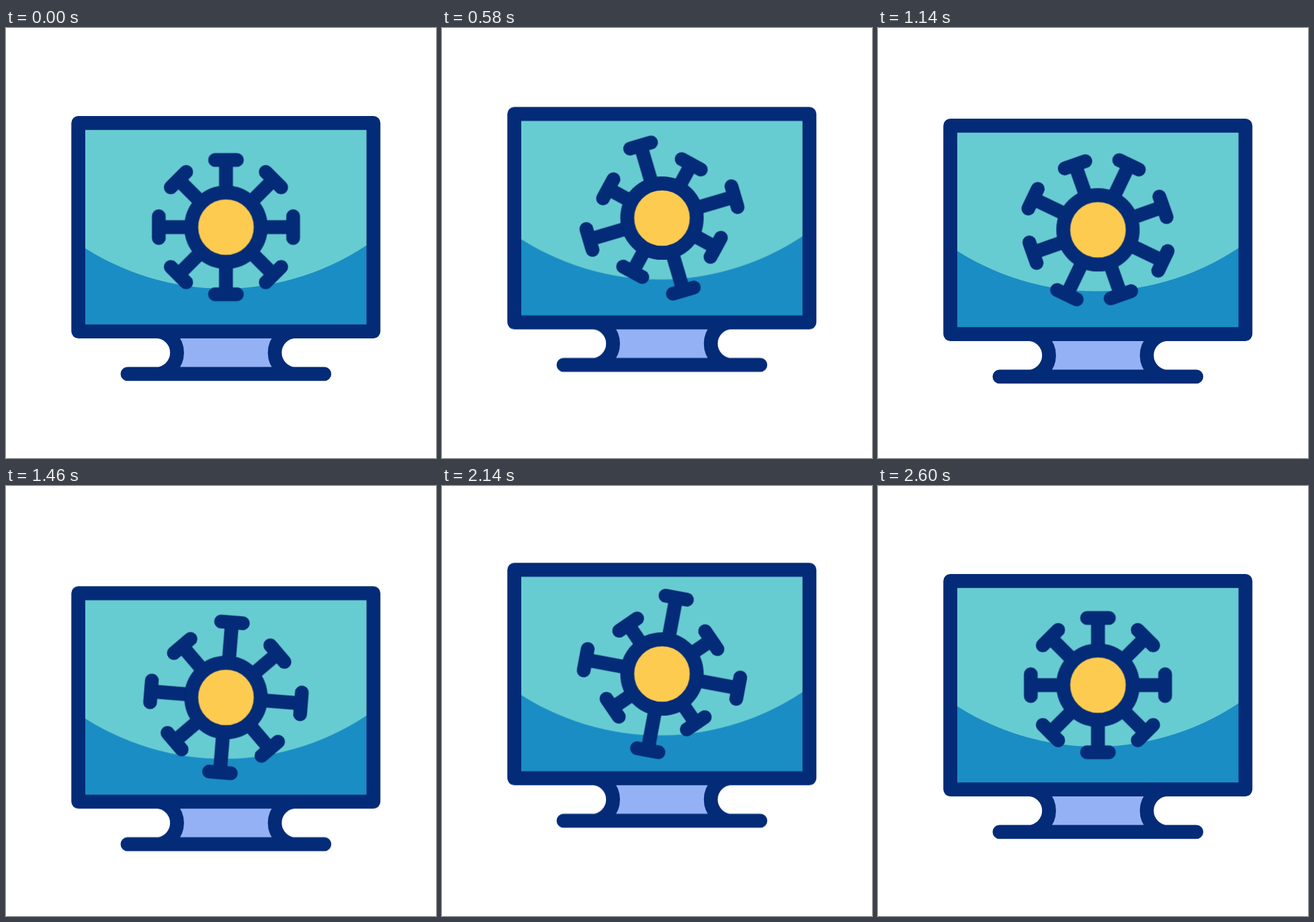
Animation of 640 by 640 pixels, one loop 2820 ms. Source, as an HTML page:

```html
<!DOCTYPE html>
<html lang="en">
<head>
<meta charset="utf-8">
<title>Virus on a monitor</title>
<style>
  html, body { margin: 0; width: 100%; height: 100%; overflow: hidden; background: #fff; }
  svg { display: block; width: 100vw; height: 100vh; }
  .line { fill: none; stroke: #042b77; stroke-width: 20.7; stroke-linecap: round; stroke-linejoin: round; }
</style>
</head>
<body>
<svg viewBox="0 0 640 640">
  <g id="monitor">
    <path fill="#95b1f5" d="M222.8 451.5A31.8 31.8 0 0 1 222.8 515H431.8A31.8 31.8 0 0 1 431.8 451.5Z"/>
    <path class="line" d="M222.8 451.5a31.75 31.75 0 0 1 0 63.5M431.8 451.5a31.75 31.75 0 0 0 0 63.5M180.9 514.9H473.8"/>
    <path fill="#67ccd1" d="M107.6 141.4H546.9V451.6H107.6Z"/>
    <path fill="#1a8dc4" d="M107.6 320.9A383 383 0 0 0 546.9 316.2V451.6H107.6Z"/>
    <path class="line" d="M107.6 141.4H546.9V451.6H107.6Z"/>
    <g transform="translate(327.4 296.4)">
      <g id="virus"></g>
      <circle class="line" r="51.7" style="fill:#fdcb50"/>
    </g>
  </g>
</svg>
<script>
  const LOOP = 2820;
  const STOPS = [0, 200, 800, 1400, 2000, 2600, LOOP];
  const EASE = 'cubic-bezier(0.3333, 0, 0.6667, 1)';
  const BOB = 19.35;
  const REACH = 12.75;
  const DIAGONAL = REACH * Math.SQRT2;

  const monitor = document.getElementById('monitor');
  const virus = document.getElementById('virus');

  function play(el, frames) {
    el.animate(frames, { duration: LOOP, iterations: Infinity }).startTime = 0;
  }

  // Vertical offsets at 800, 1400 and 2000 ms, at rest elsewhere.
  function slide(el, a, b, c) {
    play(el, [0, 0, a, b, c, 0, 0].map((y, i) => ({
      offset: STOPS[i] / LOOP,
      transform: `translate(0px, ${y}px)`,
      easing: EASE
    })));
  }

  function add(parent, tag, attrs) {
    const el = document.createElementNS('http://www.w3.org/2000/svg', tag);
    for (const key in attrs) el.setAttribute(key, attrs[key]);
    return parent.appendChild(el);
  }

  for (let i = 0; i < 8; i++) {
    const arm = add(virus, 'g', { transform: `rotate(${i * 45})` });
    const spike = add(arm, 'path', { class: 'line', d: 'M0 -30V-100M-16.2 -100H16.2' });
    if (i % 2) slide(spike, -DIAGONAL, 0, -DIAGONAL);
    else slide(spike, REACH, -REACH, REACH);
  }

  slide(monitor, -BOB, BOB, -BOB);
  play(virus, [[0, 0], [200, 0], [2600, 180], [LOOP, 180]].map(([t, deg]) => ({
    offset: t / LOOP,
    transform: `rotate(${deg}deg)`
  })));
</script>
</body>
</html>
```
